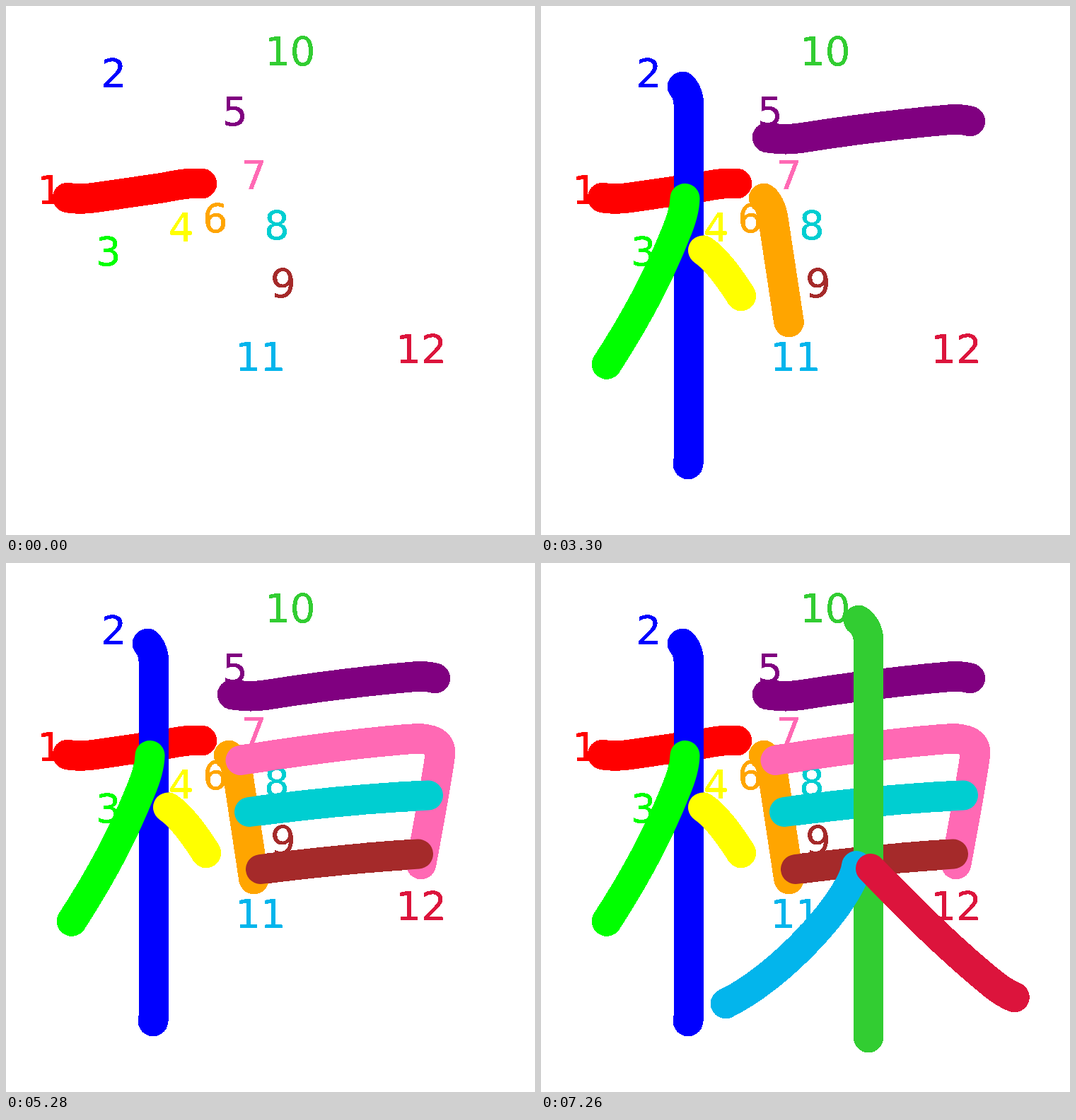
These frames come from a looping animation (748 px wide and 748 px high, 7920 ms). An HTML page:

```html
<!DOCTYPE html>
<html lang="en">
<head>
<meta charset="utf-8">
<title>Stroke order</title>
<style>
  html, body { margin: 0; height: 100%; overflow: hidden; background: #fff; }
  svg { display: block; width: 100vw; height: 100vh; }
  path { fill: none; stroke-width: 42; stroke-linecap: round; stroke-linejoin: round; }
  text { font: 56px "DejaVu Sans", Verdana, sans-serif; text-rendering: geometricPrecision; }
</style>
</head>
<body>
<svg viewBox="0 0 748 748">
  <!-- hard outer edges: any pixel covered by a fifth or more is opaque -->
  <filter id="crisp" color-interpolation-filters="sRGB" filterUnits="userSpaceOnUse" x="0" y="0" width="748" height="748">
    <feComponentTransfer><feFuncA type="discrete" tableValues="0 1 1 1 1"/></feComponentTransfer>
  </filter>
  <g filter="url(#crisp)">
    <g id="labels"></g>
    <g id="lines"></g>
  </g>
</svg>
<script>
const STEP = 660;

// colour, label x, label baseline, centre line
const strokes = [
  ['#f00', 44.5, 280, 'M87 271Q104 274 125 271L222 257Q252 251 262 251H277'],
  ['#00f', 134.4, 115, 'M200 114Q209 124 209 142V640L208 648'],
  ['#0f0', 127, 367, 'M203.5 272Q203 293 190 323Q155 411 93 506.5'],
  ['#ff0', 230, 333, 'M229 345.5Q252 361 283 410'],
  ['#800080', 306, 169, 'M320 186Q345 190 368 186.5Q480 169 580 160.5Q592 159.5 607 163'],
  ['#ffa500', 278, 320, 'M315 272Q324 279 328 299L350.5 447'],
  ['#ff69b4', 333, 259, 'M331.5 279Q470 257 570 249Q616 245 614 270Q609 308 587 426'],
  ['#00ced1', 365, 330, 'M344 352Q480 334 597 328.5'],
  ['#a52a2a', 374, 412, 'M360 433Q480 418 583 411.5'],
  ['#32cd32', 366, 84, 'M449 81Q463 92 463 110V671'],
  ['#03b5ec', 324, 516, 'M446 428C440 475 340 585 261 623'],
  ['#dc143c', 551.5, 505, 'M466 432Q569 539 640 596Q655 608 669.5 614']
];

function add(parent, tag, attrs) {
  const el = document.createElementNS('http://www.w3.org/2000/svg', tag);
  for (const key in attrs) el.setAttribute(key, attrs[key]);
  return document.getElementById(parent).appendChild(el);
}

const paths = strokes.map(([color, x, y, d], i) => {
  add('labels', 'text', { x, y, fill: color }).textContent = i + 1;
  return add('lines', 'path', { d, stroke: color });
});

function draw() {
  const last = Math.floor(performance.now() / STEP) % paths.length;
  paths.forEach((path, i) => path.style.display = i <= last ? '' : 'none');
  requestAnimationFrame(draw);
}
draw();
</script>
</body>
</html>
```
